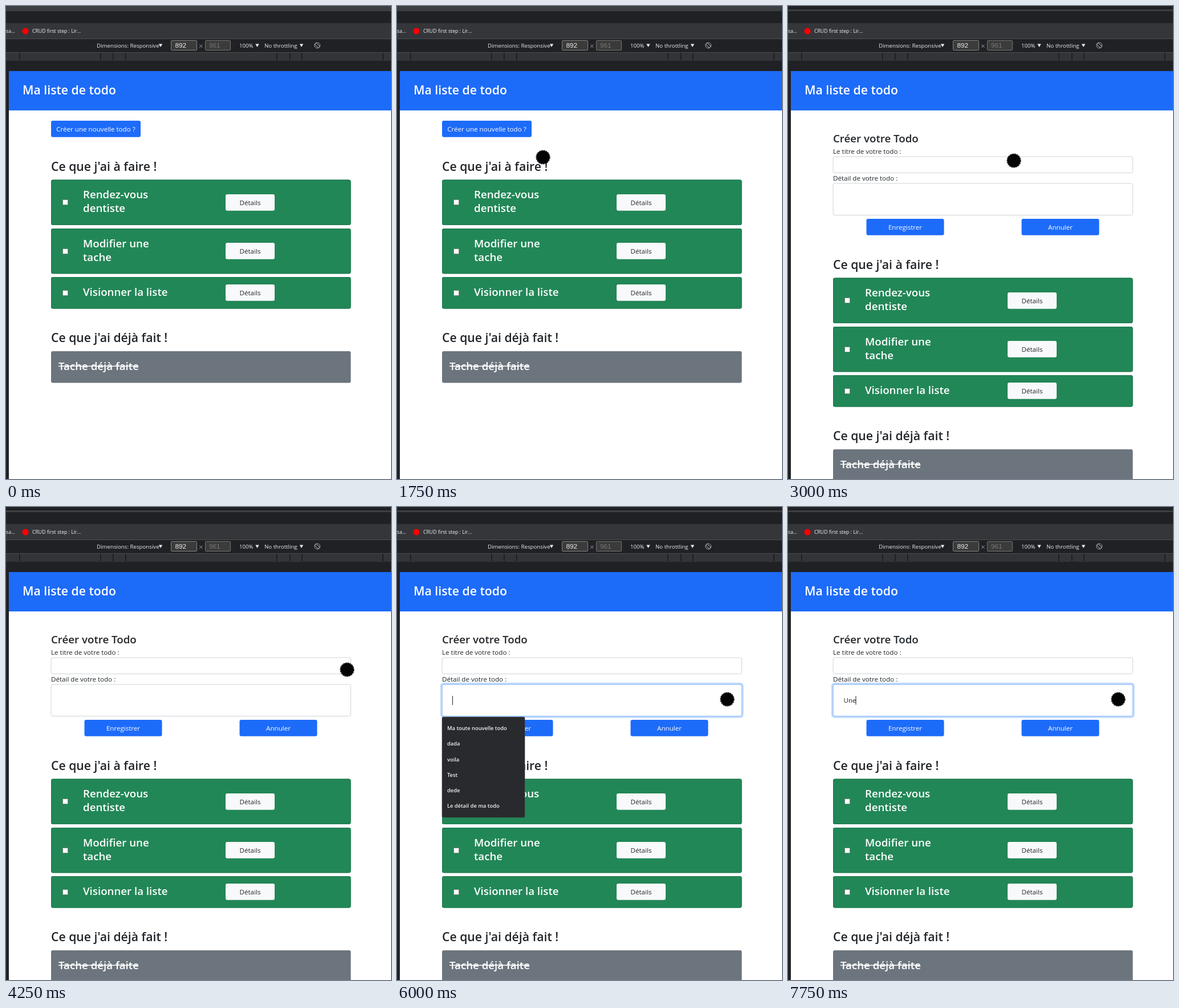
Write an HTML page that moves like this. It is 675 px wide and 829 px high and loops after 8 s.

```html
<!DOCTYPE html>
<html lang="fr">
<head>
<meta charset="utf-8">
<title>Liste de todo</title>
<style>
  html, body { margin: 0; width: 100%; height: 100%; overflow: hidden; background: #fff; }
  svg { display: block; width: 675px; height: 829px; }
  text { font-family: "Open Sans", "Noto Sans", sans-serif; font-size: 11.6px; fill: #212529; }
  .title { font-size: 21.2px; font-weight: 600; }
  .item { font-size: 18.7px; font-weight: 600; }
  .white { fill: #fff; }
  .mid { text-anchor: middle; }
  .tool { font-size: 9.7px; fill: #e8eaed; }
  .tab { font-size: 8.7px; fill: #f1f3f4; }
  .size { font: 11.8px "Liberation Sans", Arial, sans-serif; fill: #eee; }
  .option { font-size: 9.3px; font-weight: 600; fill: #f1f3f4; }
</style>
</head>
<body>
<svg id="stage" viewBox="0 0 675 829"></svg>
<script>
const BLUE = '#1d6bf9', GREEN = '#228757', DARK = '#202124';
const rect = (x, y, w, h, fill, extra = '') =>
  `<rect x="${x}" y="${y}" width="${w}" height="${h}" fill="${fill}" ${extra}/>`;
const text = (x, y, words, cls = '') => `<text x="${x}" y="${y}" class="${cls}">${words}</text>`;
const group = (id, content) => `<g id="${id}">${content}</g>`;
const button = (x, y, w, label, fill = BLUE, cls = 'white') =>
  rect(x, y, w, 28.7, fill, 'rx="3"') + text(x + w / 2, y + 18.7, label, 'mid ' + cls);
const arrow = x => `<path d="M${x - 3.2} 66.5h6.4l-3.2 5.5z" fill="#e8eaed"/>`;
const caret = (id, x, y, h) => group(id, rect(x, y, 1, h, '#222'));

const browser = [
  rect(0, 0, 675, 114, DARK),
  rect(0, 0, 5, 829, DARK),
  group('stripTall', rect(0, 0, 675, 9, '#3c4043')),
  group('stripThin', rect(0, 6, 675, 3, '#3c4043')),
  rect(0, 30, 675, 27, '#35363a'),
  rect(0, 57, 675, 1, '#4b4d51'),
  rect(0, 81, 675, 1, '#494c50'),
  rect(0, 82, 675, 14, '#333438'),
  ...[23, 165, 187, 209, 474, 497, 518, 660].map(x => rect(x, 82, 1.5, 13, '#18191b')),
  text(0, 47, 'sa...', 'tab'),
  '<circle cx="34" cy="44" r="5.5" fill="#f00"/>',
  text(46, 47, 'CRUD first step : Lir...', 'tab'),
  text(159, 73, 'Dimensions: Responsive', 'tool'), arrow(271),
  rect(289.5, 60.5, 45, 17, '#3b3b3b', 'rx="1" stroke="#858585"'),
  text(296.5, 73.3, '892', 'size'),
  '<path d="M339 67.5l5.5 5.5m0-5.5l-5.5 5.5" stroke="#9aa0a6"/>',
  rect(349.5, 60.5, 44, 17, '#3b3b3b', 'rx="1" stroke="#757575"'),
  '<text x="356" y="73.3" class="size" style="fill:#777">961</text>',
  text(409, 73, '100%', 'tool'), arrow(440.5),
  text(453, 73, 'No throttling', 'tool'), arrow(518),
  `<g transform="translate(545.7 69)" fill="none" stroke="#9aa0a6">
    <circle r="5"/><rect x="-2" y="-4.3" width="4" height="8.6" transform="rotate(-45)"/></g>`,
].join('');

function todo(y, h, lines, checkY, buttonY) {
  return rect(79, y, 525.5, h, GREEN, 'rx="3"') +
    rect(79.5, y + .5, 524.5, h - 1, 'none', 'rx="3" stroke="#1b754a"') +
    rect(99.5, checkY - 4.5, 9, 9, '#fff', 'rx="1" stroke="#777" stroke-width=".8"') +
    lines.map((line, i) => text(135, y + 32.7 + i * 24, line, 'item white')).join('') +
    button(385, buttonY, 86, 'Détails', '#f8f9fa', '');
}

const lists = [
  text(79, 289, "Ce que j'ai à faire !", 'title'),
  todo(304.5, 79.5, ['Rendez-vous', 'dentiste'], 344, 330),
  todo(390, 79.3, ['Modifier une', 'tache'], 430, 415),
  todo(475, 55.5, ['Visionner la liste'], 503, 488),
  text(79, 589, "Ce que j'ai déjà fait !", 'title'),
  rect(79, 605, 525.5, 55.5, '#6c757d', 'rx="3"'),
  text(92, 638, 'Tache déjà faite', 'item white'),
  rect(92, 630.5, 139, 1.5, '#fff'),
].join('');

const field = (y, h) => rect(79, y, 525.5, h, '#fff', 'rx="3" stroke="#ced4da"');
const ring = (id, y, h) => group(id,
  rect(77.3, y - 1.7, 528.9, h + 3.4, 'none', 'rx="4.5" stroke="#c2dbfe" stroke-width="3"') +
  rect(79, y, 525.5, h, 'none', 'rx="3" stroke="#86b7fe"'));

const form = [
  text(79, 239, 'Créer votre Todo', 'item'),
  text(79, 259, 'Le titre de votre todo :'), field(264, 28.5),
  text(79, 306, 'Détail de votre todo :'), field(311, 55.5),
  ring('titleRing', 264, 28.5), ring('detailRing', 311, 55.5),
  caret('titleCaret', 88, 270, 17), caret('detailCaret', 97, 331, 16),
  group('typed', text(97.5, 343, 'Une') + rect(118.5, 331, 1, 15.5, '#222')),
  button(137.5, 373, 136, 'Enregistrer'),
  button(409.5, 373, 136, 'Annuler'),
].join('');

const options = ['Ma toute nouvelle todo', 'dada', 'voila', 'Test', 'dede', 'Le détail de ma todo'];
const dropdown = rect(79, 368, 145, 176, '#292a2d', 'rx="2" stroke="#3c4043" stroke-width=".6"') +
  options.map((option, i) => text(88, 391.2 + i * 27.2, option, 'option')).join('');

const moveArrow = '<path d="M-1.5 0V-6H-4.5L0-11 4.5-6H1.5V0z"';
const pointer =
  group('dot', `<circle r="11.5" fill="#040404"/>
    <circle r="11.8" fill="none" stroke="#222" stroke-width="1.6" stroke-dasharray="3 1"/>`) +
  group('move', [0, 90, 180, 270].map(a => `${moveArrow} transform="rotate(${a})"/>`).join(''));

const stage = document.getElementById('stage');
stage.innerHTML = browser +
  rect(5, 114, 670, 69, BLUE) + text(29, 155, 'Ma liste de todo', 'title white') +
  group('create', button(79, 201, 157, 'Créer une nouvelle todo ?')) +
  group('form', form) + group('lists', lists) +
  group('dropdown', dropdown) + group('pointer', pointer);

const parts = {};
stage.querySelectorAll('[id]').forEach(el => parts[el.id] = el);
const show = (id, opacity) => parts[id].setAttribute('opacity', Number(opacity));

const stops = [
  [1000, 589, 396], [1250, 451, 342], [1500, 318, 300], [1750, 256, 265],
  [2000, 221, 251], [2250, 194, 230], [2750, 262, 255], [3000, 396, 271],
  [3250, 533, 268], [3500, 620, 244], [3750, 634, 240], [4250, 598, 285],
  [4500, 591, 301], [5250, 579, 337],
];

function draw(t) {
  const within = (from, to = 8000) => t >= from && t < to;
  const formOpen = within(3000);
  const fading = within(5750, 6000);
  show('stripTall', !within(2750));
  show('stripThin', within(2750));
  show('create', !formOpen);
  parts.create.firstChild.setAttribute('fill', within(2750) ? '#1859c8' : BLUE);
  show('form', formOpen);
  parts.lists.setAttribute('transform', `translate(0 ${formOpen ? 172 : 0})`);
  show('titleRing', fading ? .4 : within(5000, 5750));
  show('detailRing', fading ? .6 : within(6000));
  show('titleCaret', within(5000, 5500));
  show('detailCaret', within(5750, 6250) || within(6750, 7250));
  show('dropdown', within(5750, 7750));
  show('typed', within(7750));

  const stop = stops.filter(([start]) => start <= t).pop();
  const moving = within(7000, 7750);
  show('pointer', !!stop);
  show('dot', !moving);
  show('move', moving);
  if (stop) parts.pointer.setAttribute('transform', `translate(${stop[1]} ${stop[2]})`);
}

const begin = performance.now();
function tick() {
  draw((performance.now() - begin) % 8000);
  requestAnimationFrame(tick);
}
tick();
</script>
</body>
</html>
```
